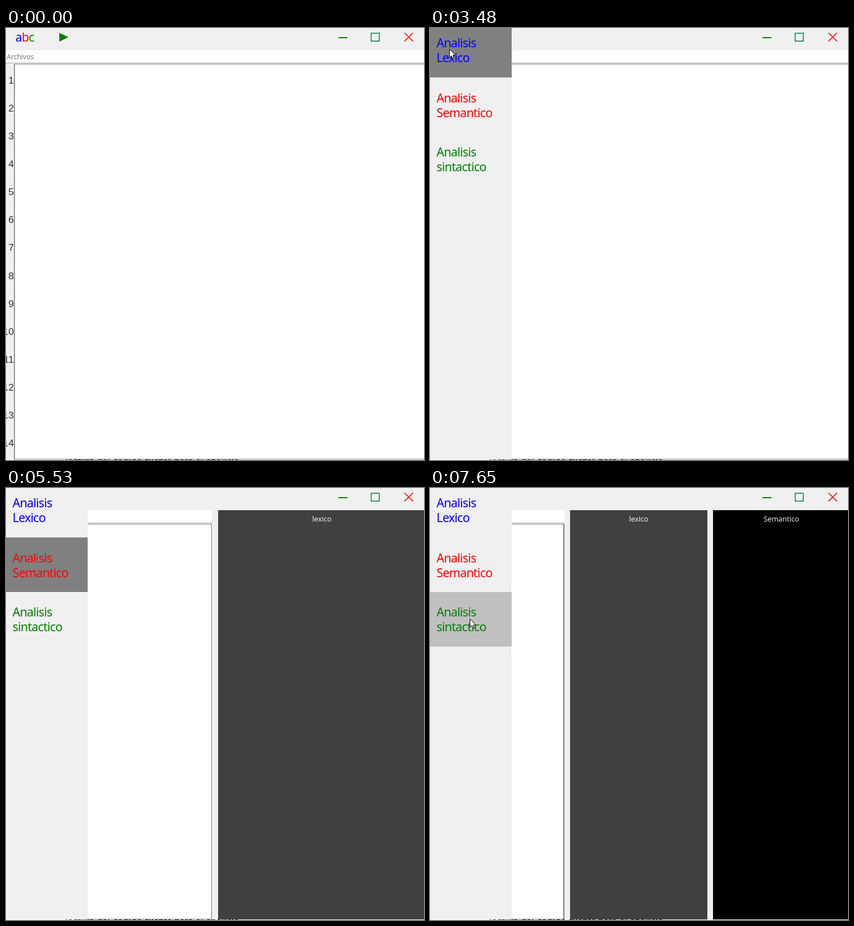
Recreate the animation shown at these times as an HTML page with a canvas. Size 737 by 760 pixels, loop 8 s.

```html
<!DOCTYPE html>
<html lang="es">
<head>
<meta charset="utf-8">
<title>Analizador</title>
<style>
html, body { margin: 0; width: 100%; height: 100%; overflow: hidden; background: #fff; }
canvas { display: block; }
</style>
</head>
<body>
<canvas id="stage" width="737" height="760"></canvas>
<script>
const ctx = document.getElementById('stage').getContext('2d');
const W = 737, H = 760, LOOP = 8000;
const BAR = '#f0f0f0', HOVER = '#c0c0c0', PRESSED = '#808080', EDGE = '#7a7d85';
const BLUE = '#0000ff', RED = '#ff0000', GREEN = '#008000';
const BIG = '21.33px "Noto Sans", sans-serif';
const SMALL = '12px "Open Sans", sans-serif';
const LABEL = '12.8px "Open Sans", sans-serif';
const DIGITS = '17.3px "Liberation Sans", sans-serif';

// Pointer moves: start, end, number of steps, from x, y, to x, y
const moves = [
  [470, 1030, 9, 720, 820, 360, 17],
  [1370, 1370, 1, 88, 6, 88, 6],
  [1440, 1570, 3, 88, 6, 94, 23],
  [1830, 2180, 6, 94, 23, 28, 15],
  [2860, 3080, 4, 28, 15, 34, 37],
  [4080, 4580, 8, 34, 37, 30, 14],
  [4910, 5260, 6, 30, 14, 56, 120],
  [6000, 6330, 6, 56, 120, 50, 49],
  [6400, 6740, 6, 50, 49, 38, 14],
  [7065, 7650, 10, 38, 14, 70, 230]
];

const menuItems = [
  { top: 0, bottom: 87, words: ['Analisis', 'Lexico'], base: 34, color: BLUE },
  { top: 87, bottom: 183, words: ['Analisis', 'Semantico'], base: 131, color: RED },
  { top: 183, bottom: 279, words: ['Analisis', 'sintactico'], base: 226, color: GREEN }
];

const within = (t, ...spans) => spans.some(([a, b]) => t >= a && t < b);

function pointer(t) {
  if (t < 470 || within(t, [1100, 1370])) return null;
  const [start, end, steps, x0, y0, x1, y1] = moves.filter(m => t >= m[0]).pop();
  const gap = (end - start) / Math.max(1, steps - 1) || 1;
  const k = Math.min(1, (Math.floor((t - start) / gap + 1e-6) + 1) / steps);
  return { x: Math.round(x0 + (x1 - x0) * k), y: Math.round(y0 + (y1 - y0) * k) };
}

function box(x0, y0, x1, y1, color) {
  ctx.fillStyle = color;
  ctx.fillRect(x0, y0, x1 - x0, y1 - y0);
}

function text(str, x, y, font, color, align = 'left', spacing = 0) {
  ctx.font = font;
  ctx.fillStyle = color;
  ctx.textAlign = align;
  ctx.letterSpacing = spacing + 'px';
  ctx.fillText(str, x, y);
}

function shape(points, fill) {
  ctx.beginPath();
  points.forEach(([x, y]) => ctx.lineTo(x, y));
  ctx.closePath();
  ctx.fillStyle = fill;
  ctx.fill();
}

function drawToolbar(hit, pressed) {
  box(0, 0, W, 39, BAR);
  if (pressed || hit(0, 0, 68, 34)) box(0, 0, 68, 34, pressed ? PRESSED : HOVER);
  if (hit(73, 0, 130, 34)) box(73, 0, 130, 34, HOVER);
  let x = 16.5;
  [['a', BLUE], ['b', RED], ['c', GREEN]].forEach(([letter, color]) => {
    text(letter, x, 24, BIG, color, 'left', -0.75);
    x += ctx.measureText(letter).width;
  });
  shape([[94, 8.5], [110, 16.2], [94, 24]], GREEN);

  box(586, 16, 602, 18, GREEN);
  ctx.lineWidth = 1.6;
  ctx.strokeStyle = '#00913f';
  ctx.strokeRect(643.8, 9.3, 14.4, 13.8);
  ctx.strokeStyle = RED;
  ctx.beginPath();
  ctx.moveTo(702.5, 8.5);
  ctx.lineTo(717.5, 23.5);
  ctx.moveTo(717.5, 8.5);
  ctx.lineTo(702.5, 23.5);
  ctx.stroke();
}

function drawEditor(right, left, thick, active, hover) {
  box(0, 39, right, 61, '#fff');
  if (hover) box(0, 39, 56, 61, '#e5f3ff');
  text('Archivos', hover ? 2.5 : 1.5, 55, SMALL, active ? '#000' : '#6d6d6d');
  box(0, 61, right, 62, '#a0a0a0');
  box(left, 62, right, 63, '#fff');
  box(left, 63, right, 759, EDGE);
  const inset = right === W ? 0 : thick ? 2 : 1;
  box(left + (thick ? 1 : 1.6), 64, right - inset, 758, '#fff');
  for (let n = 1; n <= 14; n++) {
    text(n, left - 0.2, Math.round(49.08 * (n - 1) + 98), DIGITS, '#333', 'right');
  }
}

function drawPanel(x0, x1, color, label, center) {
  box(x0, 39, x1, 759, color);
  text(label, center, 59, LABEL, '#fff', 'center');
}

// Sliver of a document behind the window
function drawBackdrop() {
  ctx.save();
  ctx.beginPath();
  ctx.rect(0, 759, W, 1);
  ctx.clip();
  box(0, 759, W, H, '#fff');
  text('lectura del codigo fuente para el analisis', 104, 768,
    '19px "Liberation Serif", serif', '#000');
  ctx.restore();
}

function drawMenu(hit, pressed) {
  box(0, 0, 144, 759, BAR);
  menuItems.forEach(({ top, bottom, words, base, color }) => {
    if (hit(0, top, 144, bottom)) box(0, top, 144, bottom, pressed ? PRESSED : HOVER);
    words.forEach((word, i) => text(word, 11.5, base + i * 26.4, BIG, color, 'left', -0.75));
  });
}

function drawArrow({ x, y }) {
  ctx.save();
  ctx.translate(x + 0.5, y + 0.5);
  shape([[0, 0], [0, 14.5], [3.3, 11.4], [5.5, 16.3], [7.8, 15.3], [5.7, 10.5], [10.3, 10.3]], '#fff');
  ctx.strokeStyle = '#000';
  ctx.lineWidth = 1;
  ctx.stroke();
  ctx.restore();
}

function drawBeam({ x, y }) {
  ctx.save();
  ctx.globalCompositeOperation = 'difference';
  box(x, y - 7, x + 1, y + 8, '#fff');
  for (const end of [y - 8, y + 8]) {
    box(x - 3, end, x, end + 1, '#fff');
    box(x + 1, end, x + 4, end + 1, '#fff');
  }
  ctx.restore();
}

function draw(t) {
  const p = pointer(t);
  const open = within(t, [2530, 3550], [4840, 5600], [7000, LOOP]);
  const hit = (x0, y0, x1, y1) => !!p && p.x >= x0 && p.x < x1 && p.y >= y0 && p.y < y1;
  const panels = t < 3550 ? 0 : t < 5600 ? 1 : 2;

  box(0, 0, W, H, BAR);
  drawToolbar(hit, within(t, [2380, 2530], [4710, 4840], [6870, 7000]));
  drawEditor([W, 363, 237][panels], panels === 2 ? 15 : 14, panels === 2,
    t >= 2380, !open && hit(0, 39, 56, 61));
  if (panels === 1) drawPanel(374, W, '#404040', 'lexico', 557);
  if (panels === 2) {
    drawPanel(247, 489, '#404040', 'lexico', 368);
    drawPanel(499, W, '#000', 'Semantico', 619.5);
  }
  drawBackdrop();
  if (open) drawMenu(hit, within(t, [3350, 3550], [5460, 5600]));
  if (p) {
    const beam = p.y > 62 && (t < 1100 || within(t, [5530, 6400]));
    (beam ? drawBeam : drawArrow)(p);
  }
}

function tick() {
  draw(performance.now() % LOOP);
  requestAnimationFrame(tick);
}
tick();
</script>
</body>
</html>
```
